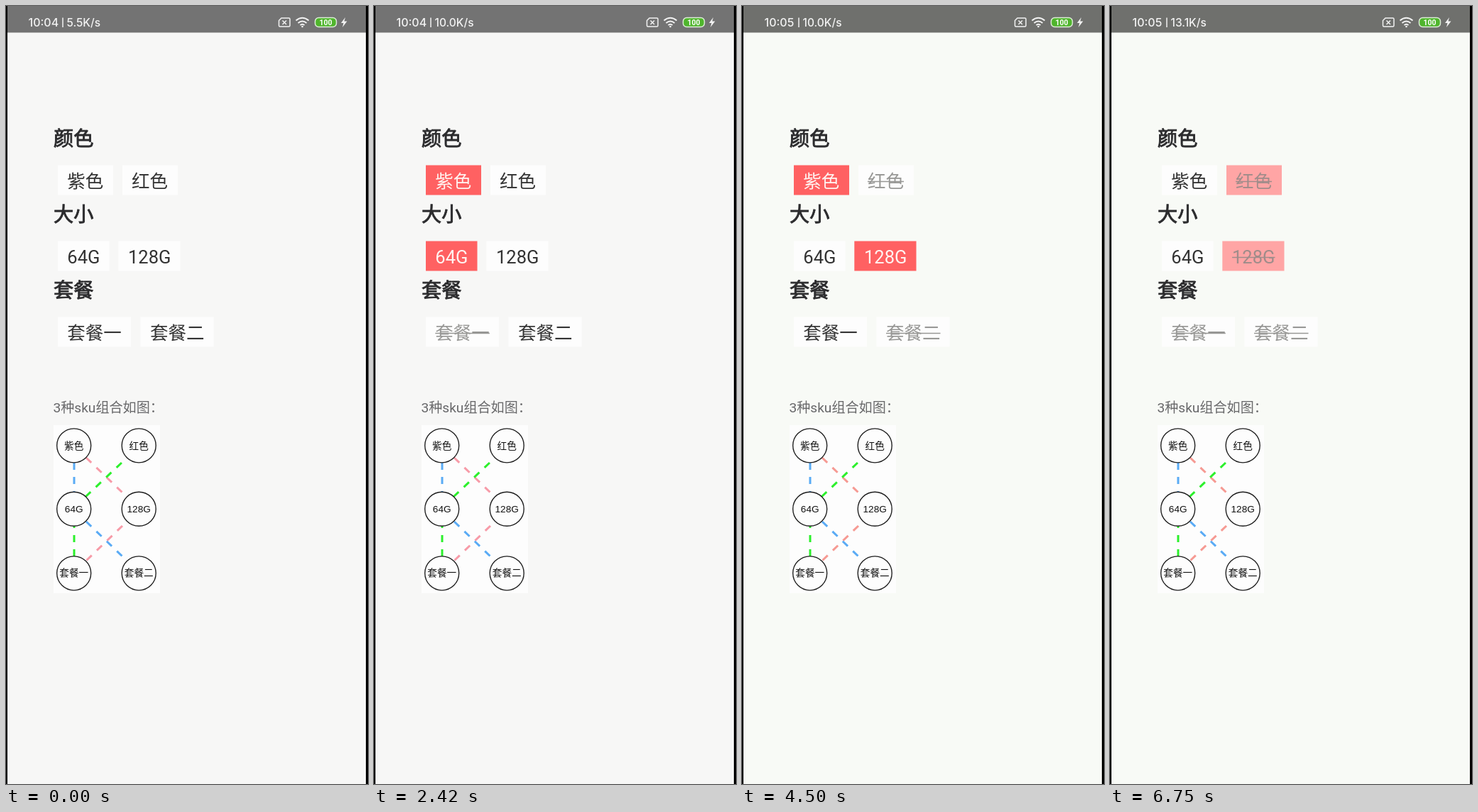
Recreate the animation shown at these times as an HTML page. Size 510x1097 px, loop 8000 ms.

```html
<!DOCTYPE html>
<html lang="zh-CN">
<head>
<meta charset="utf-8">
<title>SKU</title>
<style>
html, body { margin: 0; height: 100%; overflow: hidden; background: #000; }
svg { display: block; width: 100vw; height: 100vh; }
text { font-family: Roboto, "Noto Sans CJK SC", "Noto Sans CJK", sans-serif; }

.page, .bar, .pink, .option, .bar-text text { animation: 8s step-end infinite; }
.page { fill: #f7f7f6; animation-name: page; }
.bar { fill: #737373; animation-name: bar; }
.bar-text text { font: 500 15.5px Inter, sans-serif; fill: #f2f2f2; }
.bar-text .t1, .bar-text .t2 { font-size: 16px; }
.bar-text .t1 { animation-name: t1; }
.bar-text .t2 { animation-name: t2; }
.bar-text .s1 { animation-name: s1; }
.bar-text .s2 { animation-name: s2; }
.bar-text .s3 { animation-name: s3; }

.title { font-size: 28.2px; fill: #2b2b2d; stroke: #2b2b2d; stroke-width: .9; }
.note { font-size: 19.1px; fill: #68686a; }

.option { fill: #fdfdfd; color: #333; stroke-opacity: 0; }
.option text { font-size: 25.5px; fill: currentColor; }
.option path { stroke: currentColor; stroke-width: 1.5; }

.link { fill: none; stroke-width: 3; stroke-dasharray: 10; }
.pink { stroke: #f79ba8; animation-name: pink; }
.blue { stroke: #5aabf5; }
.green { stroke: #2cf02c; }
.nodes circle { fill: none; stroke: #1c1c1c; stroke-width: 1.35; }
.nodes text { font: 13.6px "Liberation Sans", "Noto Sans CJK SC", "Noto Sans CJK", sans-serif; fill: #111; text-anchor: middle; }

@keyframes page { 46.875%, 100% { fill: #f8faf6; } }
@keyframes bar { 46.875%, 100% { fill: #6f706d; } }
@keyframes pink { 46.875%, 100% { stroke: #f69a93; } }

@keyframes t1 { 0% { opacity: 1; } 46.875%, 100% { opacity: 0; } }
@keyframes t2 { 0% { opacity: 0; } 46.875%, 100% { opacity: 1; } }
@keyframes s1 { 0% { opacity: 1; } 14.625%, 100% { opacity: 0; } }
@keyframes s2 { 0% { opacity: 0; } 14.625% { opacity: 1; } 64.625%, 100% { opacity: 0; } }
@keyframes s3 { 0% { opacity: 0; } 64.625%, 100% { opacity: 1; } }

/* taps: 1250, 2420, 4500 and 6670 ms */
@keyframes purple {
  15.625% { fill: #ff6162; color: #fff3f0; }
  83.375%, 100% { fill: #fdfdfd; color: #333; }
}
@keyframes red {
  56.25% { fill: #fdfdfd; color: #979795; stroke-opacity: 1; }
  83.375%, 100% { fill: #ffa5a5; color: #a08c8a; stroke-opacity: 1; }
}
@keyframes small {
  30.25% { fill: #ff6162; color: #fff3f0; }
  56.25%, 100% { fill: #fdfdfd; color: #333; }
}
@keyframes large {
  56.25% { fill: #ff6162; color: #fff3f0; stroke-opacity: 0; }
  83.375%, 100% { fill: #ffa5a5; color: #a08c8a; stroke-opacity: 1; }
}
@keyframes plan1 {
  30.25% { color: #979795; stroke-opacity: 1; }
  56.25% { color: #333; stroke-opacity: 0; }
  83.375%, 100% { color: #979795; stroke-opacity: 1; }
}
@keyframes plan2 { 56.25%, 100% { color: #979795; stroke-opacity: 1; } }
</style>
</head>
<body>
<svg viewBox="0 0 510 1097" preserveAspectRatio="none">
  <rect class="page" x="2" width="505" height="1097"/>
  <rect class="bar" x="2" width="505" height="37.5"/>

  <g class="bar-text">
    <text class="t1" x="31.5" y="28.5">10:04</text>
    <text class="t2" x="31.5" y="28.5">10:05</text>
    <path d="M80 16.5V30" stroke="#f2f2f2" stroke-width="1.5"/>
    <text class="s1" x="85.5" y="28.5">5.5K/s</text>
    <text class="s2" x="85.5" y="28.5">10.0K/s</text>
    <text class="s3" x="85.5" y="28.5">13.1K/s</text>
  </g>

  <g fill="none" stroke="#f2f2f2" stroke-width="1.5">
    <path d="M388 17H398.5Q400 17 400 18.5V27.5Q400 29 398.5 29H386Q384.5 29 384.5 27.5V20.5Z"/>
    <path d="M389.5 20.5L395 26M395 20.5L389.5 26"/>
    <g stroke-width="1.9">
      <path d="M408.5 20.5Q417.5 13 426.5 20.5"/>
      <path d="M411.5 24Q417.5 19 423.5 24"/>
      <path d="M414.5 27Q417.5 24.5 420.5 27"/>
    </g>
    <circle cx="417.5" cy="29" r="1.3" fill="#f2f2f2" stroke="none"/>
    <rect x="435.5" y="16.5" width="30" height="13" rx="5" fill="#4fb52c" stroke="#dcebd6"/>
    <path d="M478 16L472 24H475.5L474 30L480.5 21.5H476.5Z" fill="#f2f2f2" stroke="none"/>
  </g>
  <text x="450.5" y="27" text-anchor="middle" font-size="10.5" font-weight="700" fill="#fff">100</text>

  <g class="title">
    <text x="67" y="196.5">颜色</text>
    <text x="67" y="303.5">大小</text>
    <text x="67" y="410.5">套餐</text>
  </g>

  <g class="option" style="animation-name: purple">
    <rect x="73" y="224.5" width="78" height="42"/>
    <text x="86.3" y="256">紫色</text>
  </g>
  <g class="option" style="animation-name: red">
    <rect x="164" y="224.5" width="78" height="42"/>
    <text x="177" y="256">红色</text>
    <path d="M177 247.5h51"/>
  </g>
  <g class="option" style="animation-name: small">
    <rect x="73" y="331.5" width="72.5" height="42"/>
    <text x="86.3" y="363">64G</text>
  </g>
  <g class="option" style="animation-name: large">
    <rect x="158.3" y="331.5" width="87.2" height="42"/>
    <text x="172" y="363">128G</text>
    <path d="M172 354.5h60.5"/>
  </g>
  <g class="option" style="animation-name: plan1">
    <rect x="73" y="438.5" width="103" height="42"/>
    <text x="86.3" y="470">套餐一</text>
    <path d="M86.3 461.5h76.5"/>
  </g>
  <g class="option" style="animation-name: plan2">
    <rect x="189.5" y="438.5" width="103" height="42"/>
    <text x="203" y="470">套餐二</text>
    <path d="M203 461.5h76.5"/>
  </g>

  <text class="note" x="66.5" y="572.5">3种sku组合如图：</text>

  <rect x="67" y="591" width="150" height="237" fill="#fdfdfd"/>
  <path class="link pink" d="M113 637L165 687M164 733L112 783"/>
  <path class="link blue" d="M96 644V686M113 727L165 777"/>
  <path class="link green" d="M112 692L164 643M96 776V733"/>
  <g class="nodes">
    <circle cx="95.7" cy="619.8" r="24"/><text x="95.7" y="624.5">紫色</text>
    <circle cx="187.2" cy="619.8" r="24"/><text x="187.2" y="624.5">红色</text>
    <circle cx="95.7" cy="709.2" r="24"/><text x="95.7" y="713.5">64G</text>
    <circle cx="187.2" cy="709.2" r="24"/><text x="187.2" y="713.5">128G</text>
    <circle cx="95.7" cy="799.8" r="24"/><text x="95.7" y="804.3">套餐一</text>
    <circle cx="187.2" cy="799.8" r="24"/><text x="187.2" y="804.3">套餐二</text>
  </g>
</svg>
</body>
</html>
```
